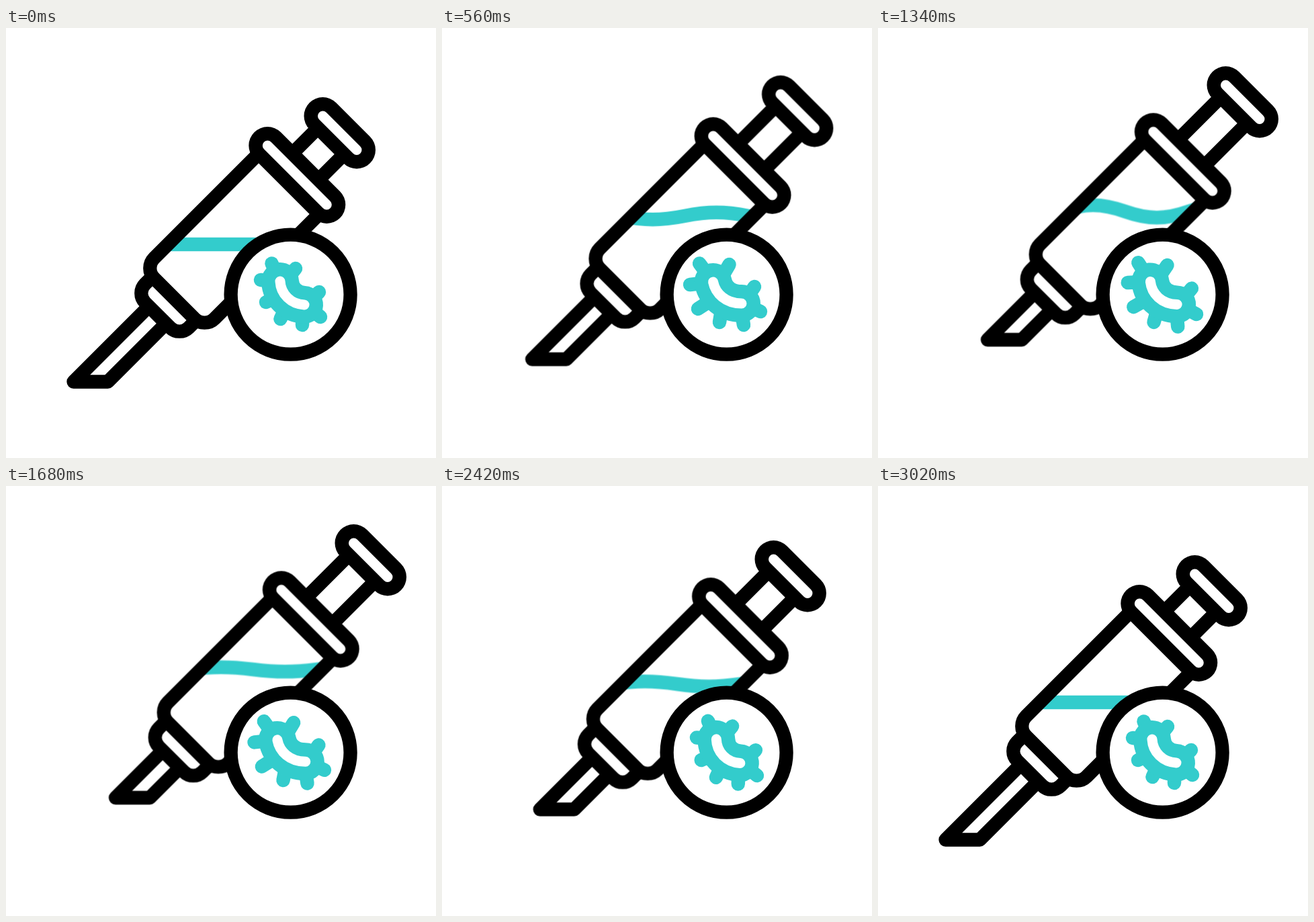
Write an HTML page without scripts that moves like this. It is 640 px wide and 640 px high and loops after 3600 ms.

```html
<!DOCTYPE html>
<html lang="en">
<head>
<meta charset="utf-8">
<title>Syringe and germ</title>
<style>
html, body { margin: 0; width: 100%; height: 100%; overflow: hidden; background: #fff; }
svg { display: block; width: 100%; height: 100%; }
svg * { animation: 3600ms linear infinite; }

.line { fill: none; stroke: #000; stroke-width: 20.3; stroke-linejoin: round; }
.shell { fill: #fff; }
.rim { stroke: #000; stroke-width: 56; stroke-linecap: round; }
.slot { fill: none; stroke: #fff; stroke-width: 15; stroke-linecap: round; }
.teal { fill: none; stroke: #33cccc; stroke-width: 20.5; stroke-linecap: round; }
.thick { stroke-width: 56; }

.body { animation-name: body; }
.plunger { animation-name: plunger; }
.needle { animation-name: needle; }
.level { animation-name: level; }
.wave { animation-name: wave; }
.bean { animation-name: bean; }
.legs { animation-name: legs; }

@keyframes body {
  0% { transform: none; animation-timing-function: cubic-bezier(.667, 0, .333, 1); }
  27.22%, 54.44% { transform: translate(20.5px, -20.5px); animation-timing-function: cubic-bezier(.5, 0, .5, 1); }
  80.56%, 100% { transform: none; }
}
@keyframes plunger {
  0% { transform: none; animation-timing-function: cubic-bezier(.667, 0, .333, 1); }
  27.08%, 53.9% { transform: translate(46px, -46px); animation-timing-function: cubic-bezier(.5, 0, .5, 1); }
  80%, 100% { transform: none; }
}
@keyframes needle {
  0%, 2.5% { transform: none; animation-timing-function: cubic-bezier(.667, 0, .333, 1); }
  28.05%, 54.44% { transform: translate(62.5px, -62.5px); animation-timing-function: cubic-bezier(.8, 0, .4, 1); }
  80.56%, 100% { transform: none; }
}
/* moves inside the barrel, so the barrel's own shift is left out */
@keyframes level {
  0% { transform: translate(-40px, 0); animation-timing-function: cubic-bezier(.667, 0, .333, 1); }
  18%, 55.4% { transform: translate(-20px, -28.5px); animation-timing-function: cubic-bezier(.5, 0, .5, 1); }
  81.4%, 100% { transform: translate(-40px, 0); }
}
@keyframes wave {
  0%, 80.56%, 100% { d: path("M177 322c35 0 60 0 95 0s60 0 95 0 60 0 95 0 60 0 95 0"); animation-timing-function: ease-in-out; }
  15.56% { d: path("M177 322c35 -7 60 -7 95 0s60 7 95 0 60 -7 95 0 60 7 95 0"); animation-timing-function: ease-in-out; }
  33.89% { d: path("M177 322c35 13 60 13 95 0s60 -13 95 0 60 13 95 0 60 -13 95 0"); animation-timing-function: ease-in-out; }
  53.89%, 57.22% { d: path("M177 322c35 1.3 60 1.3 95 0s60 -1.3 95 0 60 1.3 95 0 60 -1.3 95 0"); animation-timing-function: ease-in-out; }
  67.22% { d: path("M177 322c35 5 60 5 95 0s60 -5 95 0 60 5 95 0 60 -5 95 0"); animation-timing-function: ease-in-out; }
}
.bean, .legs { animation-timing-function: cubic-bezier(.667, 0, .333, 1); }
@keyframes bean {
  0%, 72.22%, 100% { d: path("M408 377C409 396 424 411 444 412"); }
  14.44%, 43.33% { d: path("M403.5 378C407 395 422 410 446 410"); }
  28.89%, 57.78% { d: path("M410 376C408 396 421 413 443 415"); }
}
@keyframes legs {
  0%, 72.22%, 100% { d: path("M408 377L395.5 350.5M412 382L431 358M408 377L379 375M414 396L387 408M422 404L408.5 433M442 412L441 442M446 412L468 430M446 412L466 393"); }
  14.44%, 43.33% { d: path("M403.5 378L383 350.5M410 382L427.5 352M403.5 378L369 382M412 398L381 418M418 408L413 438M444 410L449 442M448 410L474 422M448 410L465 385"); }
  28.89%, 57.78% { d: path("M410 376L398 346M414 380L438 355.5M410 376L378.5 371.5M414 394L378.5 408M422 406L404.5 437.5M441 415L439.5 451M445 415L474 436M445 415L471.5 394"); }
}
</style>
</head>
<body>
<svg viewBox="0 0 640 640">
  <defs>
    <path id="barrel" d="M388.5 174.5L220.5 342.5A21.2 21.2 0 0 0 220.5 372.5L280.5 432.5A21.2 21.2 0 0 0 310.5 432.5L478.5 264.5"/>
    <clipPath id="inside"><use href="#barrel"/></clipPath>
  </defs>

  <path class="line needle" d="M213.5 413.5L100.5 526.5H151.5L239 439"/>

  <g class="plunger">
    <path class="line" d="M401.5 211.5l75 -75M440.5 250.5l75 -75"/>
    <path class="rim" d="M471.5 131L522 181.5"/>
    <path class="slot" d="M471.5 131L522 181.5"/>
  </g>

  <g class="body">
    <path class="line shell" d="M218 370L207 381A19.5 19.5 0 0 0 207 408.6L244.4 446A19.5 19.5 0 0 0 272 446L283 435"/>
    <use class="shell" href="#barrel"/>
    <g clip-path="url(#inside)">
      <g class="level">
        <path class="teal wave" d="M177 322c35 0 60 0 95 0s60 0 95 0 60 0 95 0 60 0 95 0"/>
      </g>
    </g>
    <use class="line" href="#barrel"/>
    <path class="rim" d="M389.3 175l88 88"/>
    <path class="slot" d="M389.3 175l88 88"/>
  </g>

  <circle class="line shell" cx="423.6" cy="396.7" r="89"/>
  <path class="teal legs" d="M408 377L395.5 350.5M412 382L431 358M408 377L379 375M414 396L387 408M422 404L408.5 433M442 412L441 442M446 412L468 430M446 412L466 393"/>
  <path class="teal thick bean" d="M408 377C409 396 424 411 444 412"/>
  <path class="slot bean" d="M408 377C409 396 424 411 444 412"/>
</svg>
</body>
</html>
```
